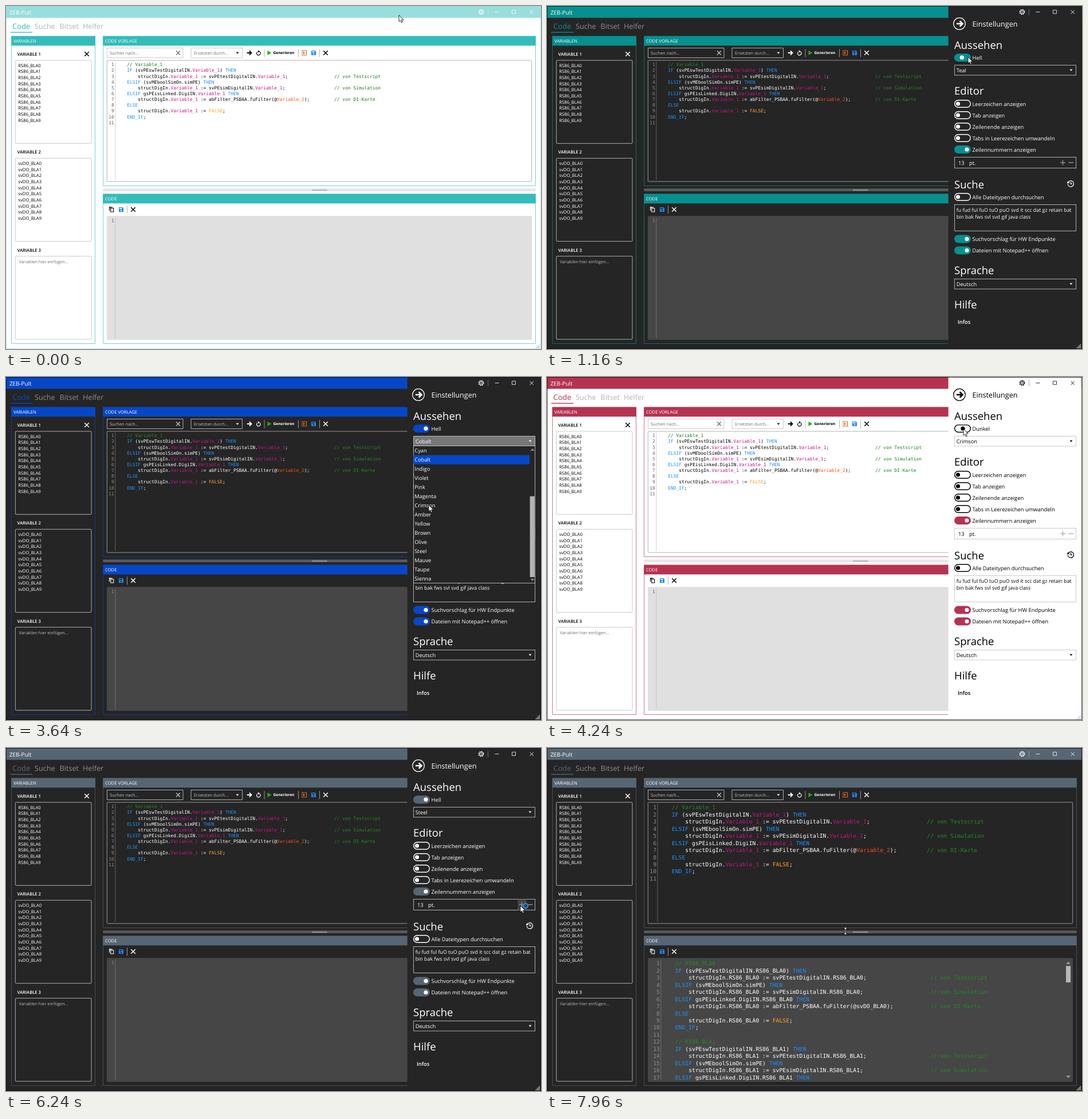
Recreate the animation shown at these times as an HTML page. Size 934 px wide and 600 px high, loop 8 s.

```html
<!DOCTYPE html>
<html lang="de">
<head>
<meta charset="utf-8">
<title>ZEB-Pult</title>
<style>
html, body { margin: 0; width: 100%; height: 100%; overflow: hidden; }
svg { display: block; width: 934px; height: 600px; }
text { font-family: "Open Sans", "Noto Sans", sans-serif; white-space: pre; text-rendering: geometricPrecision; }
.mono text { font-family: "DejaVu Sans Mono", monospace; }
.k { fill: #1e90ff; } .c { fill: var(--com); } .v { fill: #c71585; }
.w { fill: #ff4f14; } .f { fill: #ffa51e; }
</style>
</head>
<body>
<svg id="stage" viewBox="0 0 934 600" xmlns="http://www.w3.org/2000/svg"></svg>
<script>
const LOOP = 8000;
const PX = 2 / 3; // the window is shown at two thirds of its size
const stage = document.getElementById('stage');
const FG = 'var(--fg)', BG = 'var(--bg)', ACC = 'var(--acc)', LINE = 'var(--line)',
  MUT = 'var(--mut)', HINT = 'var(--hint)', CAP = 'var(--cap)', EDGE = 'var(--edge)';

const THEMES = {
  light: { fg: '#000', bg: '#fff', mut: '#b4b4b4', line: '#b0b0b0', edge: '#8c8c8c', hint: '#707070',
    num: '#666', split: '#e6e6e6', grip: '#bdbdbd', out: '#e0e0e0', com: '#148014', field: '#d4d4d4', soft: '#ccc' },
  dark: { fg: '#fff', bg: '#252525', mut: '#8c8c8c', line: '#f4f4f4', edge: '#d0d0d0', hint: '#bcbcbc',
    num: '#8c8c8c', split: '#5a5a5a', grip: '#858585', out: '#464646', com: '#228b22', field: '#777', soft: '#444' }
};
const NAMES = ('Red Green Blue Purple Orange Lime Emerald Teal Cyan Cobalt Indigo Violet Pink Magenta ' +
  'Crimson Amber Yellow Brown Olive Steel Mauve Taupe Sienna').split(' ');
const ACCENTS = { Teal: [0, 171, 169], Cobalt: [0, 80, 239], Crimson: [162, 0, 37], Steel: [100, 118, 135] };

// Drawing helpers; text is placed by the middle of its capitals
const text = (x, y, s, size, fill = FG, more = '') =>
  `<text x="${x}" y="${y + size * .36}" font-size="${size}" fill="${fill}" ${more}>${s}</text>`;
const snap = v => Math.round(v / PX) * PX;
const rect = (x, y, w, h, fill, more = '', inset = 0) => {
  const l = snap(x) + inset, t = snap(y) + inset;
  return `<rect x="${l}" y="${t}" width="${snap(x + w) - inset - l}" height="${snap(y + h) - inset - t}" fill="${fill}" ${more}/>`;
};
const box = (x, y, w, h, stroke = LINE, fill = BG, more = '') =>
  rect(x, y, w, h, fill, `stroke="${stroke}" stroke-width="${PX}" ${more}`, PX / 2);
const path = (d, stroke, width = 1, fill = 'none') =>
  `<path d="${d}" fill="${fill}" stroke="${stroke}" stroke-width="${width}"/>`;
const solid = (d, fill) => `<path d="${d}" fill="${fill}"/>`;
const cross = (x, y, r, color = FG, w = 1.5) =>
  path(`M${x - r} ${y - r}l${2 * r} ${2 * r}m0 ${-2 * r}l${-2 * r} ${2 * r}`, color, w);
const down = (x, y) => solid(`M${x - 2.5} ${y - 1.3}h5l-2.5 3z`, FG);
const bar = (x, y) => rect(x, y - 7, PX, 14, EDGE);
const bold = 'font-weight="600"', medium = 'font-weight="500"';

const group = (x, y, w, h, title) =>
  box(x, y, w, h, ACC) + rect(x, y, w, 17, ACC) + text(x + 3.7, y + 8.5, title, 7.65, '#fff', medium);

const disk = (x, y) => solid(`M${x - 4} ${y - 4}h6.4l1.6 1.6v6.4h-8z`, '#1e86f0') +
  solid(`M${x - 2.8} ${y - 2.8}h4.4v2h-4.4z`, BG) + `<circle cx="${x}" cy="${y + 1.7}" r="1.2" fill="${BG}"/>`;

const arrow = (x, y, s) =>
  path(`M${x - 4.5 * s} ${y}h${7.5 * s}M${x} ${y - 3.6 * s}l${3.6 * s} ${3.6 * s}l${-3.6 * s} ${3.6 * s}`, FG, 2.1 * s);

function variables() {
  const list = (n, y, word) => text(19.5, y - 10.3, 'VARIABLE ' + n, 7.6, FG, bold) + box(16, y, 133.5, 146, LINE, BG, 'rx="1.3"') +
    (word ? [...Array(10).keys()].map(i => text(21.3, y + 9.3 + i * 16 * PX, word + i, 7.7, FG, medium)).join('')
      : text(22.5, y + 9.8, 'Variablen hier einfügen...', 7.4, HINT));
  return group(9.3, 52.5, 146.7, 538.2, 'VARIABLEN') + cross(141, 84, 3.8) +
    list(1, 94.5, 'RS86_BLA') + list(2, 266, 'svDO_BLA') + list(3, 437.5);
}

function toolbar() {
  return box(176, 73.5, 133.5, 17.3) + text(181, 82.2, 'Suchen nach...', 7.5, HINT) + cross(300.5, 82, 3.4, HINT, 1.4) +
    box(322.7, 73.5, 90, 17.3) + text(328, 82.2, 'Ersetzten durch...', 7.4, HINT) + down(404, 82) +
    arrow(425, 82, .95) +
    path('M438.6 80.4a3.3 3.3 0 1 0 4.6 .1', FG, 1.2) + solid('M439.8 77.2l3.6 2.2l-3.6 2.2z', FG) +
    bar(450.7, 82) + solid('M456.5 78l6.8 4l-6.8 4z', '#1fae1f') +
    text(466.5, 81.8, 'Generieren', 6.6, FG, 'font-weight="700"') + bar(510, 82) +
    path('M517 80v-2h7.5v8h-7.5v-2M515.5 82h5.5m-2 -2l2 2l-2 2', '#e06a1c', 1.2) +
    disk(537, 82) + bar(547.3, 82) + cross(558, 82, 3.8);
}

const gear = `<circle cx="829.5" cy="10.5" r="3.4" fill="none" stroke="${CAP}"/>` +
  `<circle cx="829.5" cy="10.5" r="4.3" fill="none" stroke="${CAP}" stroke-width="1.4" stroke-dasharray="1.7 1.68"/>` +
  `<circle cx="829.5" cy="10.5" r="1.4" fill="none" stroke="${CAP}" stroke-width=".8"/>`;
const caption = gear + rect(841.3, 5, PX, 11, CAP, 'opacity=".5"') +
  path('M853.5 10.5h7M883.5 7.2h6v6h-6z', CAP, .8) + cross(917.7, 10.6, 3.1, CAP, .9);

function toggle(y, label, on, id = '') {
  const look = on ? `fill="${ACC}" stroke="${ACC}"` : `fill="${BG}" stroke="${FG}"`;
  return `<rect ${id && 'id="switch"'} x="711.7" y="${y - 6.3}" width="27.6" height="12.6" rx="6.3" stroke-width="1.4" ${look}/>` +
    `<circle ${id && 'id="knob"'} cx="${on ? 733 : 717.5}" cy="${y}" r="3.6" fill="${on ? '#fff' : FG}"/>` +
    text(742.5, y + .3, label, 9.35, FG, medium + (id && ' id="mode"'));
}

function panel() {
  const head = (y, s) => text(711, y, s, 18.5);
  const drop = (y, s, id = '') => box(711, y - 8.7, 213, 18, LINE, BG, id && 'id="combo"') +
    text(714.7, y + .3, s, 9.25, FG, medium + (id && ' id="accent"')) + down(915, y);
  const options = ['Leerzeichen anzeigen', 'Tab anzeigen', 'Zeilenende anzeigen',
    'Tabs in Leerezeichen umwandeln', 'Zeilennummern anzeigen'];
  return rect(700.7, PX, 232.7, 600 - 2 * PX, BG) +
    `<circle cx="720" cy="31" r="10.3" fill="none" stroke="${FG}" stroke-width="1.2"/>` + arrow(720.7, 31, 1.3) +
    text(742.5, 31, 'Einstellungen', 12.6) + head(68.3, 'Aussehen') + toggle(90.2, '', false, 'id') +
    drop(112, '', 'id') + head(148.5, 'Editor') +
    options.map((s, i) => toggle(171 + i * 20, s, i == 4)).join('') +
    box(711, 264, 213, 20) + rect(893.3, 264.7, 15.3, 18.7, 'var(--soft)', 'id="hover"') +
    text(718, 274.2, '13', 9.4, FG, 'id="size"') + text(737, 274.2, 'pt.', 9.4) +
    path('M896 274h9m-4.5 -4.5v9M910.5 274h9', MUT, 1.5) +
    head(312, 'Suche') + path('M909.8 308.5a5.2 5.2 0 1 1 -.6 3M914.5 308v3.2h2.6', FG, 1.3) +
    solid('M907.6 310.2l5.2 -.4l-3.4 -3.6z', FG) +
    toggle(334, 'Alle Dateitypen durchsuchen', false) + box(711, 347.3, 213, 46.7) +
    text(714.7, 356.8, 'fu fud ful fuO tuO puO svd it scc dat gz retain bat', 8.85, FG, medium) +
    text(714.7, 369.2, 'bin bak fws svl svd gif java class', 8.85, FG, medium) +
    toggle(407.5, 'Suchvorschlag für HW Endpunkte', true) + toggle(427.5, 'Dateien mit Notepad++ öffnen', true) +
    head(462.2, 'Sprache') + drop(486, 'Deutsch') + head(522.5, 'Hilfe') +
    text(717, 552.5, 'Infos', 9.3, FG, bold) + '<g id="list"></g>';
}

function dropdown(offset, chosen) {
  let s = box(711, 120, 213, 240.7);
  for (let i = 0; i < 15; i++) {
    const name = NAMES[i + offset], y = 120.7 + i * 16;
    if (name == chosen) s += rect(711.3, y, 202.7, 16, ACC);
    s += text(713.3, y + 7.6, name, 9.25, name == chosen ? '#fff' : FG, medium);
  }
  return s + solid('M915.5 129l3.5 -4l3.5 4zM915.5 353l3.5 4l3.5 -4z', MUT) +
    rect(914.7, 133 + offset / 23 * 217, 8, 141.5, '#b4b4b4');
}

// Structured-text sample
const note = (s, c) => s.padEnd(76) + '// ' + c;
const template = (v, w) => [
  '// ' + v,
  `IF (svPEswTestDigitalIN.${v}) THEN`,
  note(`    structDigIn.${v} := svPEtestDigitalIN.${v};`, 'von Testscript'),
  'ELSIF (svMEboolSimOn.simPE) THEN',
  note(`    structDigIn.${v} := svPEsimDigitalIN.${v};`, 'von Simulation'),
  `ELSIF gsPEisLinked.DigiIN.${v} THEN`,
  note(`    structDigIn.${v} := abFilter_PSBAA.fuFilter(@${w});`, 'von DI-Karte'),
  'ELSE',
  `    structDigIn.${v} := FALSE;`,
  'END_IF;', ''
];
const paint = s => s.replace(/\/\/.*|\b(?:IF|THEN|ELSIF|ELSE|END_IF|FALSE|Variable_[12])\b/g, m => {
  const kind = m[0] == '/' ? 'c' : m == 'FALSE' ? 'f' : m == 'Variable_1' ? 'v' : m == 'Variable_2' ? 'w' : 'k';
  return `<tspan class="${kind}">${m}</tspan>`;
});

function code(lines, top, bottom, pt, digits) {
  const adv = pt * .3665, step = pt * .78, size = adv / .602, left = 182.7 + digits * adv;
  return path(`M${left - 1.4} ${top}V${bottom}`, MUT, .6) + lines.map((s, i) => {
    const y = top + (i + .5) * step;
    return text(left - 3.4, y, i + 1, size, 'var(--num)', 'text-anchor="end"') + text(left + 4 * adv, y, paint(s), size);
  }).join('');
}

const generated = [...template('RS86_BLA0', 'svDO_BLA0'), ...template('RS86_BLA1', 'svDO_BLA1')].slice(0, 17);
const scrollbar = solid('M906.3 378l3.7 -4.5l3.7 4.5zM906.3 573l3.7 4.5l3.7 -4.5z', '#9c9c9c') +
  rect(906, 381, 8, 29, '#b8b8b8');

let dots = '';
for (let i = 0; i < 4; i++) for (let j = 0; j <= i; j++)
  dots += rect(930.7 - j * 2, 591.3 + i * 2, 2 * PX, 2 * PX, 'var(--dots)');

stage.innerHTML = `<defs><clipPath id="clip"><path d="M176 367h742v214.5h-742z"/></clipPath></defs>` +
  rect(0, 0, 934, 600, BG) + rect(0, 0, 934, 20.7, 'var(--bar)') + text(6, 11, 'ZEB-Pult', 9.8, '#fff') +
  text(11, 35.6, 'Code', 13, ACC) + text(50, 35.6, 'Suche', 12.7, MUT) + text(93.5, 35.6, 'Bitset', 12.7, MUT) +
  text(134, 35.6, 'Helfer', 12.7, MUT) + rect(7.3, 45, 38.7, 2 * PX, ACC) + variables() +
  group(169.3, 52.5, 755.3, 262.3, 'CODE VORLAGE') + toolbar() + box(176, 94.5, 742, 213, EDGE, BG, 'rx="1.3"') +
  '<g id="top" class="mono"></g>' +
  rect(169.3, 319.5, 755.3, 4.5, 'var(--split)') + rect(534, 320.5, 26.7, 2.7, 'var(--grip)') +
  group(169.3, 328.5, 755.3, 262.2, 'CODE') +
  path('M182.3 354v-2.3h-1.8v6.3M182.7 353.7h5v6.3h-5zM180.5 352h5.5', FG, 1.1) + disk(201, 356) +
  bar(211.3, 356) + cross(222, 356, 3.8) + rect(176, 367, 742, 217, 'var(--out)', 'rx="2"') +
  '<g id="bottom" class="mono" clip-path="url(#clip)"></g>' +
  `<g id="panel">${panel()}</g>` + caption + dots + box(0, 0, 934, 600, 'var(--rim)', 'none') +
  '<circle id="busy" cx="907" cy="276" r="4.1" fill="none" stroke="#1e86e0" stroke-width="2.4"/>' +
  '<path id="arrow" d="M0 0v11.3l2.6 -2.4l1.8 4.1l1.9 -.8l-1.8 -4h3.6z" fill="#fff" stroke="#000" stroke-width=".8"/>' +
  '<path id="resize" d="M0 -6.8l3 3.4h-2.2v6.8h2.2l-3 3.4l-3 -3.4h2.2v-6.8h-2.2z" fill="#fff" stroke="#000" stroke-width=".7"/>';

const el = {};
stage.querySelectorAll('[id]').forEach(e => el[e.id] = e);
const show = (e, on) => e.setAttribute('visibility', on ? 'visible' : 'hidden');
const clamp = v => Math.max(0, Math.min(1, v));
const easeOut = v => 1 - (1 - clamp(v)) ** 3;
const within = (t, a, b) => t >= a && t < b;
const blend = (rgb, a, base) => `rgb(${rgb.map(c => Math.round(c * a + base * (1 - a)))})`;

// Pointer path: time, x, y
const MOVES = [
  [20, 686, 16], [200, 828, 9], [620, 828, 9], [1040, 735, 89], [1480, 735, 89], [1600, 736, 112],
  [1720, 736, 112], [2240, 738, 272], [2320, 738, 272], [2720, 743, 195], [3000, 740, 122],
  [3240, 740, 122], [3600, 738, 224], [3800, 738, 224], [4120, 727, 91], [4620, 727, 91],
  [4760, 736, 112], [4840, 736, 112], [4920, 736, 128], [5360, 738, 304], [5560, 738, 304],
  [6200, 898, 276], [6840, 898, 276], [7000, 719, 30], [7080, 719, 30], [7360, 482, 83],
  [7440, 482, 83], [7640, 449, 206], [7680, 449, 206], [7830, 480, 342], [7950, 521, 320]
];
function pointer(t) {
  const i = MOVES.findIndex(m => m[0] > t);
  if (i < 0) return MOVES[MOVES.length - 1].slice(1);
  if (!i) return MOVES[0].slice(1);
  const [t0, x0, y0] = MOVES[i - 1], [t1, x1, y1] = MOVES[i];
  const p = (t - t0) / (t1 - t0), e = p * p * (3 - 2 * p);
  return [x0 + (x1 - x0) * e, y0 + (y1 - y0) * e];
}

const cache = {};
function once(name, key, draw) {
  if (cache[name] === key) return;
  cache[name] = key;
  draw();
}

function render(t) {
  const dark = within(t, 1085, 4163) || t >= 4560;
  const accent = t < 2320 ? 'Teal' : t < 3800 ? 'Cobalt' : t < 5560 ? 'Crimson' : 'Steel';
  const pt = t < 6400 ? 13 : t < 6520 ? 14 : t < 6640 ? 15 : 16;
  const active = t >= 360, built = t >= 7420;
  const out = easeOut((t - 380) / 280) - easeOut((t - 7040) / 280);
  const open = within(t, 1640, 2320) || within(t, 3040, 3800) || within(t, 4800, 5560);
  const offset = t < 3360 ? 0 : t < 3440 ? 3 : t < 3520 ? 6 : 8;

  once('theme', [dark, accent, active, out > .5].join(), () => {
    const base = dark ? 37 : 255, rgb = ACCENTS[accent], theme = THEMES[dark ? 'dark' : 'light'];
    const vars = {
      ...theme, acc: blend(rgb, .8, base), bar: blend(rgb, active ? .8 : .4, base),
      cap: out > .5 ? theme.fg : '#fff', rim: active ? '#000' : blend(rgb, .4, base),
      dots: dark ? '#ddd' : '#a9c4dc'
    };
    for (const k in vars) stage.style.setProperty('--' + k, vars[k]);
    el.accent.textContent = accent;
    el.mode.textContent = dark ? 'Hell' : 'Dunkel';
    el.switch.setAttribute('fill', dark ? ACC : BG);
    el.switch.setAttribute('stroke', dark ? ACC : FG);
  });
  once('top', pt, () => {
    el.top.innerHTML = code(template('Variable_1', 'Variable_2'), 97.4, 304, pt, 2);
    el.size.textContent = pt;
  });
  once('bottom', pt + ' ' + built, () => {
    el.bottom.innerHTML = code(built ? generated : [''], 370.4, 581, pt, built ? 3 : 2) + (built ? scrollbar : '');
  });
  once('list', [open, offset, accent].join(), () => {
    el.list.innerHTML = open ? dropdown(offset, accent) : '';
    el.combo.setAttribute('fill', open ? 'var(--field)' : BG);
  });

  el.panel.setAttribute('transform', `translate(${(1 - out) * 234} 0)`);
  const turn = s => clamp((t - s) / 170);
  el.knob.setAttribute('cx', 717.5 + 15.5 * (turn(1085) - turn(4163) + turn(4560)));
  el.knob.setAttribute('fill', FG);

  const [x, y] = pointer(t);
  const onSplit = x > 169 && Math.abs(y - 321.5) < 3 && out < .5;
  for (const e of [el.arrow, el.resize]) e.setAttribute('transform', `translate(${x} ${y})`);
  show(el.arrow, !onSplit);
  show(el.resize, onSplit);
  show(el.hover, within(t, 6180, 6870));
  show(el.busy, within(t, 6180, 6400));
}

let start;
function tick(now) {
  start ??= now;
  render((now - start) % LOOP);
  requestAnimationFrame(tick);
}
render(0);
requestAnimationFrame(tick);
</script>
</body>
</html>
```
